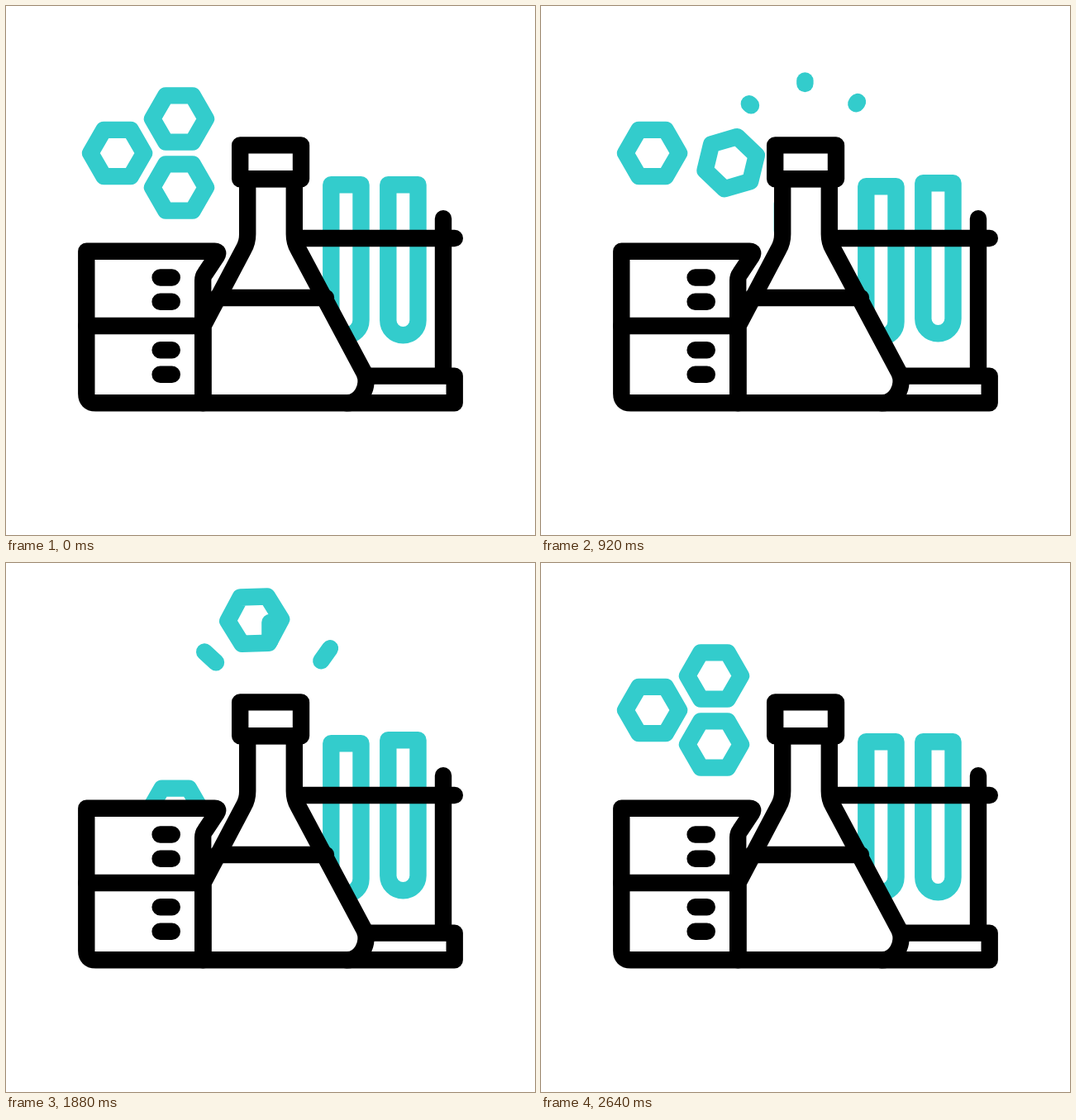
Recreate the animation shown at these times as an HTML page with a canvas. Size 640 by 640 pixels, loop 3000 ms.

```html
<!DOCTYPE html>
<html lang="en">
<head>
<meta charset="utf-8">
<title>Laboratory</title>
<style>
  html, body { margin: 0; width: 100%; height: 100%; overflow: hidden; background: #fff; }
  canvas { display: block; width: 640px; height: 640px; }
</style>
</head>
<body>
<canvas id="stage" width="640" height="640"></canvas>
<script>
const ctx = document.getElementById('stage').getContext('2d');
const TEAL = '#33cccc', BLACK = '#000';
const LOOP = 3000, STEP = 40, END = 2640;
const TOP = [320, 56.5];

const tube = new Path2D('M393.3 380.2V216.3H429.5V380.2a18.1 18.1 0 0 1-36.2 0z');
const stand = new Path2D('M352 281H542.8M529 257.3V447.6M430 447.6H542.7V480.3H412');
const flask = new Path2D(`M292.2 209V276C292.2 283 290.5 289 287.6 294L238.5 387V480.3H412.4
  C430 480.3 440 459 433.5 444L353.4 294C350.5 289 348.8 283 348.8 276V209z`);
const flaskTop = new Path2D('M283.2 168.4H357V209.2H283.2zM255 353H387');
const beaker = new Path2D(`M97.3 296.7H252Q258.5 297 255 302.5L241 323.5Q238.2 327 238.2 332
  V480.3H108.5Q97.3 480.3 97.3 469z`);
const marks = new Path2D('M97.3 387H238M186.6 328.5h14.2m-14.2 29.3h14.2m-14.2 58.4h14.2m-14.2 29.5h14.2');

const hexagon = new Path2D();
for (let i = 0; i < 6; i++) {
  const a = i * Math.PI / 3;
  hexagon.lineTo(32.5 * Math.cos(a), 32.5 * Math.sin(a));
}
hexagon.closePath();

// Each molecule rises over the flask, drops in, and returns out of the beaker.
const molecules = [
  { home: [209.5, 136.5], rise: 200, riseTime: 440, turn: -90, fall: 680, back: 1760, from: [203.6, 346] },
  { home: [209.5, 219.5], rise: 800, riseTime: 440, turn: -90, fall: 1440, back: 1972, from: [209.5, 350] },
  { home: [134.6, 178], rise: 1560, riseTime: 400, turn: -270, fall: 2200, back: 2200, from: [134.6, 350] }
];

// Splash strokes, inner end first
const drops = [[254, 120.3, 240.2, 107.5], [319.4, 94, 319.4, 72], [381.3, 118.3, 392, 103.3]];

const clamp = x => Math.min(1, Math.max(0, x));
const ease = x => (x = clamp(x), x * x * (3 - 2 * x));
const mix = (a, b, k) => a + (b - a) * k;

function draw(path, color, x = 0, y = 0, angle = 0, filled = false) {
  ctx.save();
  ctx.translate(x, y);
  ctx.rotate(angle * Math.PI / 180);
  if (filled) {
    ctx.fillStyle = '#fff';
    ctx.fill(path);
  }
  ctx.strokeStyle = color;
  ctx.stroke(path);
  ctx.restore();
}

function hexBetween(a, b, k, turn = 0) {
  draw(hexagon, TEAL, mix(a[0], b[0], k), mix(a[1], b[1], k), turn * k);
}

function drawMolecule(m, t) {
  const dropTime = t - m.fall;
  if (dropTime <= 0) {
    hexBetween(m.home, TOP, ease((t - m.rise) / m.riseTime), m.turn);
  } else if (dropTime <= 240) {
    draw(hexagon, TEAL, TOP[0], TOP[1] + 0.00345 * dropTime ** 2, 90);
  }
  if (t > m.back) hexBetween(m.from, m.home, ease((t - m.back) / 400));
}

function drawSplash(t) {
  if (t <= 200 || t >= 580) return;
  const head = ease((t - 200) / 160), tail = ease((t - 440) / 140);
  for (const [x0, y0, x1, y1] of drops) {
    const line = new Path2D();
    line.moveTo(mix(x0, x1, tail), mix(y0, y1, tail));
    line.lineTo(mix(x0, x1, head), mix(y0, y1, head));
    draw(line, TEAL);
  }
}

function render(t) {
  ctx.fillStyle = '#fff';
  ctx.fillRect(0, 0, 640, 640);
  ctx.lineWidth = 20.4;
  ctx.lineCap = ctx.lineJoin = 'round';

  const phase = t < 200 || t > 2600 ? 0 : (t - 200) % 800 / 400;
  const shift = 19.4 * ease(phase < 1 ? phase : 2 - phase);
  draw(tube, TEAL, 0, shift);
  draw(tube, TEAL, 69, -shift);
  draw(stand, BLACK);

  for (const m of molecules) {
    drawMolecule(m, t);
    drawSplash(t - m.fall);
  }

  draw(flask, BLACK, 0, 0, 0, true);
  draw(flaskTop, BLACK, 0, 0, 0, true);
  draw(beaker, BLACK, 0, 0, 0, true);
  draw(marks, BLACK);
}

function tick() {
  const t = Math.floor(performance.now() % LOOP / STEP) * STEP;
  render(t < END ? t : 0);
  requestAnimationFrame(tick);
}
tick();
</script>
</body>
</html>
```
